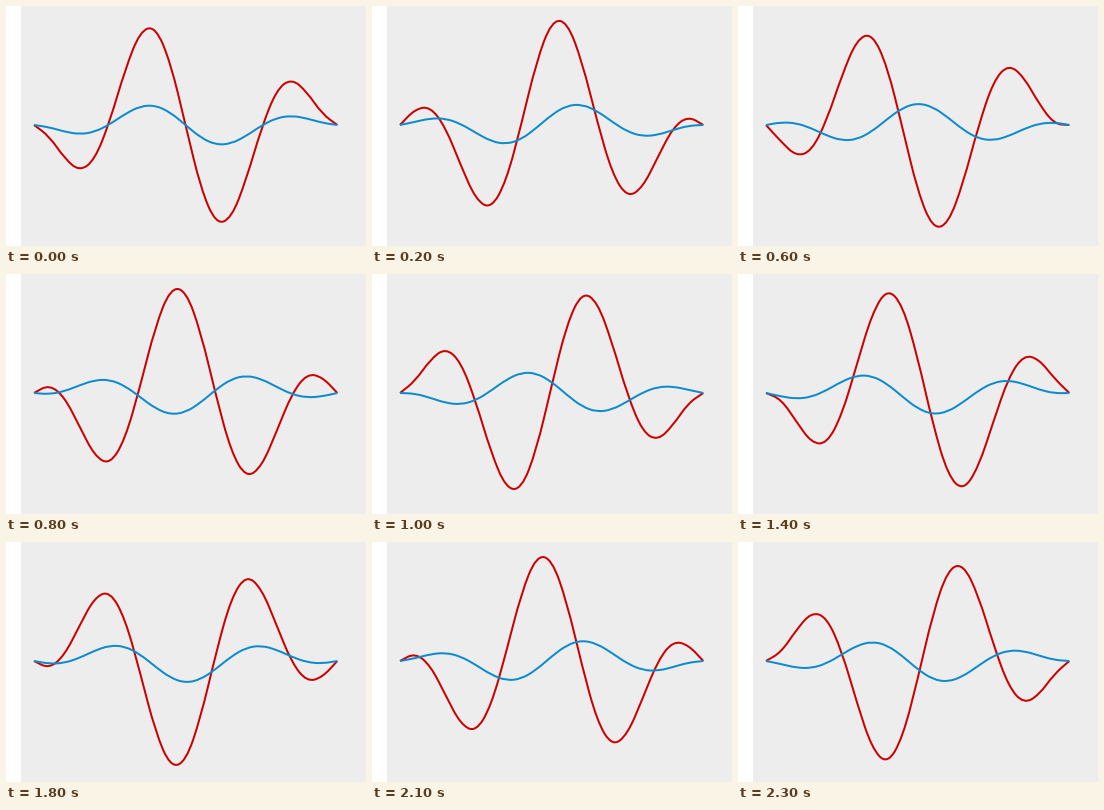
Recreate the animation shown at these times as a matplotlib script. Size 360 by 240 pixels, loop 2.4 s.

```python
import numpy as np
import matplotlib.pyplot as plt
from matplotlib.animation import FuncAnimation
from matplotlib.patches import PathPatch, Rectangle
from matplotlib.path import Path

W, H, DPI = 360, 240, 100
FRAMES, INTERVAL = 24, 100

LEFT, RIGHT, MID = 28, 331.3, 119
SEGMENTS = 20
AMP = 110
WAVELENGTH = 153.7
CREST = 141.1  # crest position at the start of the loop

# Distance travelled by the red wave; its pace drifts a little.
KEY_FRAMES = [0, 2, 6, 10, 14, 18, 23]
KEY_SHIFTS = [0, 46.5, 138, 229, 315.6, 412.8, 542.2]

xs = np.linspace(LEFT, RIGHT, SEGMENTS + 1)
envelope = np.sin(np.pi * np.linspace(0, 1, SEGMENTS + 1))


def smooth_path(x, y):
    """Quadratic curves between midpoints, with the samples as controls."""
    pts = np.column_stack([x, y])
    mids = (pts[:-1] + pts[1:]) / 2
    verts, codes = [pts[0], mids[0]], [Path.MOVETO, Path.LINETO]
    for ctrl, end in zip(pts[1:-1], mids[1:]):
        verts += [ctrl, end]
        codes += [Path.CURVE3, Path.CURVE3]
    verts.append(pts[-1])
    codes.append(Path.LINETO)
    return Path(verts, codes)


def wave(shift, amp):
    phase = 2 * np.pi * (xs - CREST - shift) / WAVELENGTH
    return smooth_path(xs, MID - amp * envelope * np.cos(phase))


fig = plt.figure(figsize=(W / DPI, H / DPI), dpi=DPI, facecolor="white")
ax = fig.add_axes([0, 0, 1, 1])
ax.set_xlim(0, W)
ax.set_ylim(H, 0)
ax.axis("off")
ax.add_patch(Rectangle((15, 0), W - 15, H, fc="#ededed", lw=0, antialiased=False))

# colour, amplitude, speed relative to the red wave
STYLES = [("#cc0000", AMP, 1.0), ("#0c8ccc", AMP / 5, 1.4)]
curves = []
for color, amp, speed in STYLES:
    patch = PathPatch(wave(0, amp), fc="none", ec=color, lw=2 * 72 / DPI,
                      capstyle="butt", joinstyle="round")
    ax.add_patch(patch)
    curves.append((patch, amp, speed))


def update(frame):
    shift = np.interp(frame, KEY_FRAMES, KEY_SHIFTS)
    for patch, amp, speed in curves:
        patch.set_path(wave(shift * speed, amp))
    return [patch for patch, _, _ in curves]


anim = FuncAnimation(fig, update, frames=FRAMES, interval=INTERVAL,
                     repeat=True, repeat_delay=0, blit=False)
plt.show()
```
